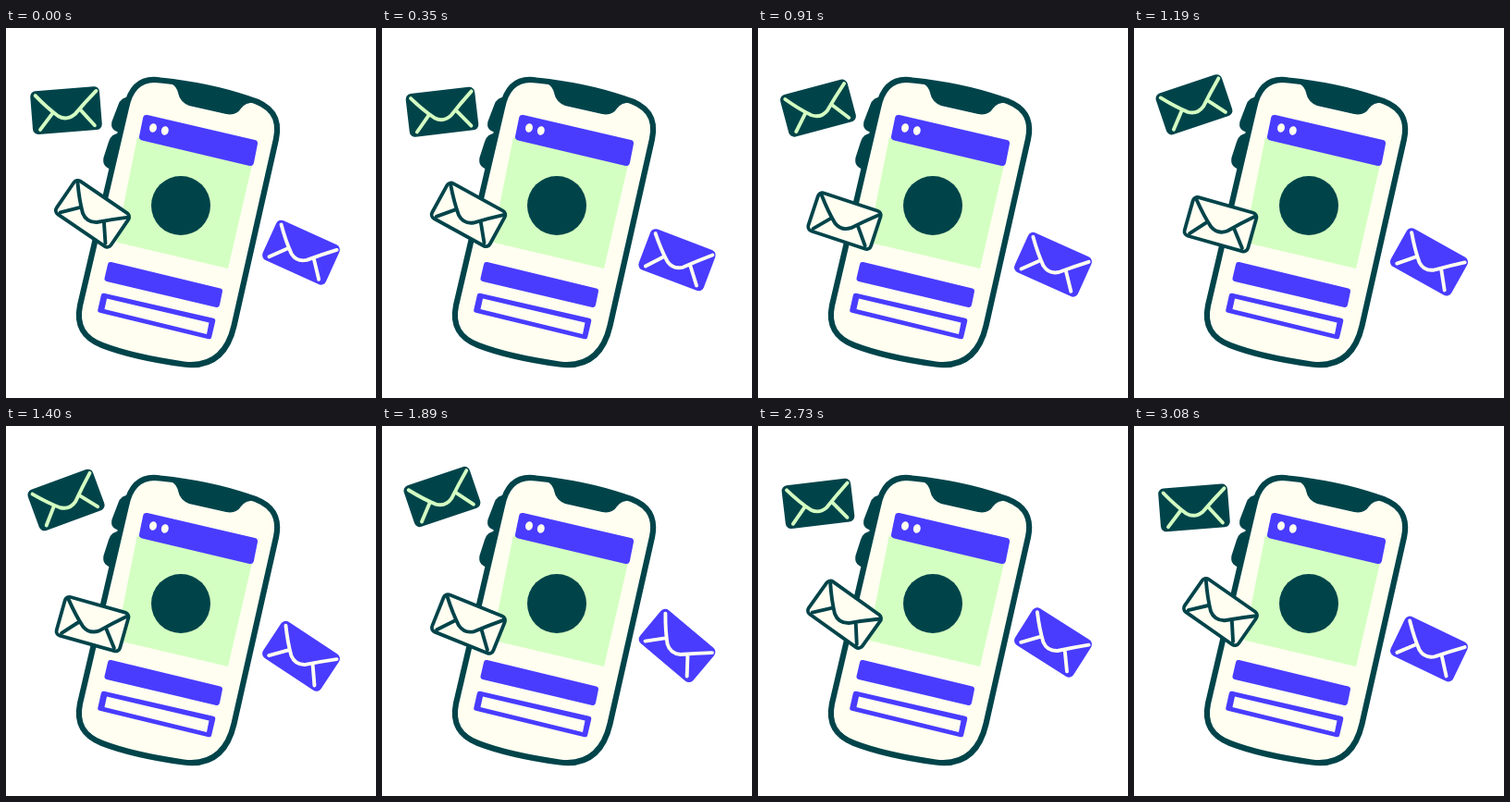
An HTML page that plays this animation: 400x400 px, repeating every 3.15 s.

```html
<!DOCTYPE html>
<html lang="en">
<head>
<meta charset="utf-8">
<title>Phone and envelopes</title>
<style>
html, body { margin: 0; width: 100%; height: 100%; overflow: hidden; background: #fff; }
svg { display: block; width: 100vw; height: 100vh; }
.dark { fill: #00444a; }
.blue { fill: #493cff; }
.cream { fill: #fffef1; }
.line { fill: none; stroke-width: 3.9; stroke-linecap: round; stroke-linejoin: round; }
</style>
</head>
<body>
<svg viewBox="0 0 400 400">
  <defs>
    <rect id="body" x="-37.5" y="-23.5" width="75" height="47" rx="6"/>
    <path id="flap" class="line" d="M-32-18.5Q-20-4-9 5.5Q0 11.5 9 5Q21-7 34-18.5M-14 1L-29.500 18.500M15 0L29.500 18.500"/>
  </defs>

  <!-- phone -->
  <path class="dark" d="M138 74Q124 73 121 84L114.500 101Q112 111 124 113ZM128 114Q114 112 111 123L105.500 140Q103.500 150 114 153Z"/>
  <path class="cream" stroke="#00444a" stroke-width="6.2" d="M167 56.500C200 60 232 66 262 76.500C286 83 297 96 292 120L246.500 322C239 354 220 367 192 363.500C160 359 130 353 104 343C84 335 75.500 322 80 300L130 86C135 62 148 53.500 167 56.500Z"/>
  <path class="dark" d="M169 56Q184 60 186 70Q188 80 198 84L238 93Q249 95 254 87Q260 79 274 81L262 74Z"/>

  <!-- screen -->
  <path fill="#d4ffc2" d="M142 118L266 148L240 260L119 231.500Z"/>
  <path class="blue" stroke="#493cff" stroke-width="8" stroke-linejoin="round" d="M152 98L268 125L264 145L148 117.500Z"/>
  <g class="cream">
    <ellipse cx="159" cy="108" rx="3.900" ry="4.800" transform="rotate(14 159 108)"/>
    <ellipse cx="171.800" cy="111" rx="3.900" ry="4.800" transform="rotate(14 171.800 111)"/>
  </g>
  <circle class="dark" cx="189" cy="192" r="32"/>
  <path class="blue" stroke="#493cff" stroke-width="6" stroke-linejoin="round" d="M113 256L231 284.500L228 299L109.500 271Z"/>
  <path class="blue" stroke="#493cff" stroke-width="5.500" stroke-linejoin="round" d="M105.500 289.500L223.500 316.500L219.500 333.500L102 305Z"/>
  <path class="cream" d="M109 292.500L219.500 318.500L217 331L106.500 304Z"/>

  <!-- envelopes -->
  <g id="darkMail"><use href="#body" class="dark"/><use href="#flap" stroke="#d4ffc2"/></g>
  <g id="creamMail">
    <rect x="-35.600" y="-21.600" width="71.200" height="43.200" rx="5" class="cream" stroke="#00444a" stroke-width="3.800"/>
    <use href="#flap" stroke="#00444a"/>
  </g>
  <g id="blueMail"><use href="#body" class="blue"/><use href="#flap" stroke="#fffef1"/></g>
</svg>
<script>
const LOOP = 3150, STEP = 70;

// Each wave is [mean, amplitude, time of its peak in ms].
const mails = [
  { id: 'darkMail', x: 65, y: [83.6, 7.1, 345], turn: [-12.5, 8, 3120] },
  { id: 'creamMail', x: 93.5, y: [207.8, 7.1, 1640], turn: [25.7, 10.2, 2865] },
  { id: 'blueMail', x: 319, y: [243.7, 12.2, 830], turn: [30.5, 10, 2040] }
];
for (const m of mails) m.el = document.getElementById(m.id);

const wave = ([mean, amp, peak], t) => mean + amp * Math.cos((t - peak) / LOOP * 2 * Math.PI);

function draw(now) {
  const t = Math.floor(now % LOOP / STEP) * STEP;
  for (const { el, x, y, turn } of mails) {
    el.setAttribute('transform', `translate(${x} ${wave(y, t)}) rotate(${wave(turn, t)})`);
  }
  requestAnimationFrame(draw);
}
draw(performance.now());
</script>
</body>
</html>
```
